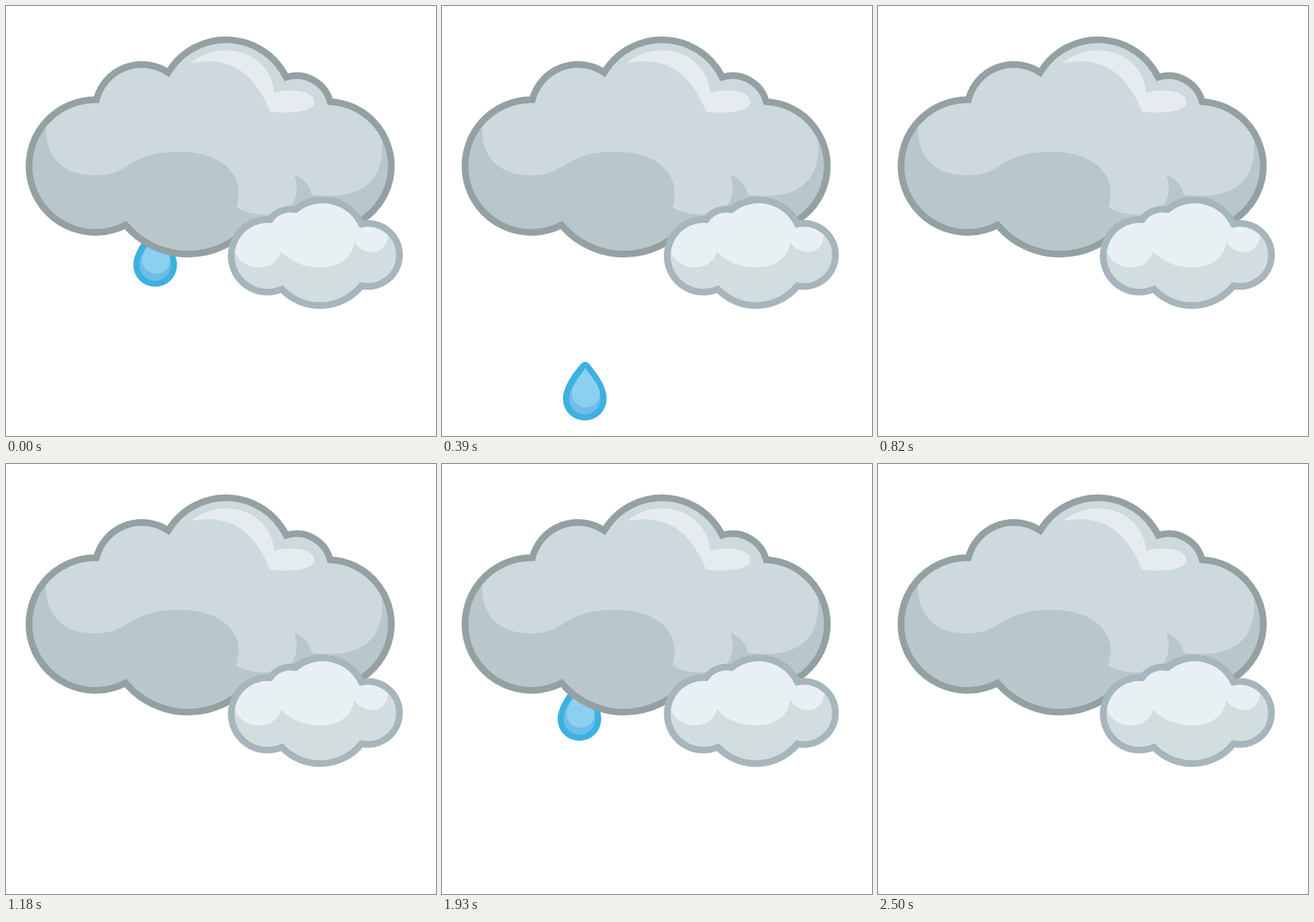
Write an HTML page that moves like this. It is 640 px wide and 640 px high and loops after 2.54 s.

```html
<!DOCTYPE html>
<html lang="en">
<head>
<meta charset="utf-8">
<title>Rain clouds</title>
<style>
  html, body { margin: 0; height: 100%; overflow: hidden; background: #fff; }
  svg { display: block; width: 100%; height: 100%; }
</style>
</head>
<body>
<svg viewBox="0 0 640 640">
  <defs>
    <path id="bigShape" d="M178 326A98.7 98.7 0 1 1 134.5 139.5A70 70 0 0 1 241.5 99A100 100 0 0 1 417 106A52 52 0 0 1 482.5 142.5A95.7 95.7 0 1 1 440 326L364 326A121.4 121.4 0 0 1 178 326Z"/>
    <path id="smallShape" d="M410.5 421.5A54 54 0 1 1 393 318A38 38 0 0 1 431 303A64 64 0 0 1 529 324.5A47 47 0 1 1 529 416.5A79 79 0 0 1 410.5 421.5Z"/>
    <clipPath id="bigClip"><use href="#bigShape"/></clipPath>
    <clipPath id="smallClip"><use href="#smallShape"/></clipPath>
    <!-- The drop's origin is its lowest point. -->
    <g id="drop">
      <path fill="#3db1e1" d="M-5-85Q.5-90 6-85C16-73 32.5-52 32.5-32.5A32.5 32.5 0 0 1-32.5-32.5C-32.5-52-14-75-5-85Z"/>
      <path fill="#6dbde8" d="M.5-78C8-66 23.5-48 23.5-32.5A23.5 23.5 0 0 1-23.5-32.5C-23.5-48-8-66 .5-78Z"/>
      <path fill="#8cd0f0" d="M1-78C9-65 22.5-53 22.5-40A21 20.5 0 0 1-19.5-40C-19.5-53-7-65 1-78Z"/>
    </g>
  </defs>

  <g id="rain"></g>

  <g stroke-width="10">
    <use href="#bigShape" fill="#b9c6cb"/>
    <g clip-path="url(#bigClip)">
      <path fill="#ced9de" d="M60 178C57 220 80 252 133 252C187 252 180 217 258 217C321 217 358 251 343 300C366 314 400 312 417 303C433 294 436 270 429 251C444 257 453 268 455 281C523 290 567 266 559 195L600 195V0H0V178Z"/>
      <path fill="#e6ecee" d="M275 85C291 72 308 66 327 66C368 66 397 94 399 129C426 122 459 126 459 143C459 158 419 161 393 157C373 107 340 72 275 85Z"/>
    </g>
    <use href="#bigShape" fill="none" stroke="#94a1a3"/>

    <use href="#smallShape" fill="#d2dddf"/>
    <g clip-path="url(#smallClip)">
      <path fill="#e8f0f4" d="M339 360C343 378 358 389 376 389C393 389 406 380 409 365C424 381 444 389 467 389C497 389 517 373 518 351C524 361 534 366 546 366C559 366 568 355 568 343H600V280H320V360Z"/>
    </g>
    <use href="#smallShape" fill="none" stroke="#a7b5bc"/>
  </g>
</svg>
<script>
  const LOOP = 2540, STEPS = 71, STEP = LOOP / STEPS;
  const SPEED = 1.49, START_Y = 280;   // px per ms; drops start behind the clouds

  // Each drop: x, and a time when its lowest point is at y.
  const drops = [
    [222, 0, 418],
    [212.5, 390, 617],
    [296, 640, 493],
    [425, 1610, 509],
    [204.5, 1930, 412]
  ].map(([x, time, y]) => {
    const node = document.createElementNS("http://www.w3.org/2000/svg", "use");
    node.setAttribute("href", "#drop");
    document.getElementById("rain").append(node);
    return { node, x, start: time - (y - START_Y) / SPEED };
  });

  function draw(now) {
    const step = Math.floor((now % LOOP + 5) / STEP) % STEPS;
    const time = Math.round(step * STEP / 10) * 10;
    for (const { node, x, start } of drops) {
      const age = (time - start + LOOP) % LOOP;
      node.setAttribute("transform", `translate(${x} ${START_Y + SPEED * age})`);
    }
    requestAnimationFrame(draw);
  }
  draw(0);
</script>
</body>
</html>
```
